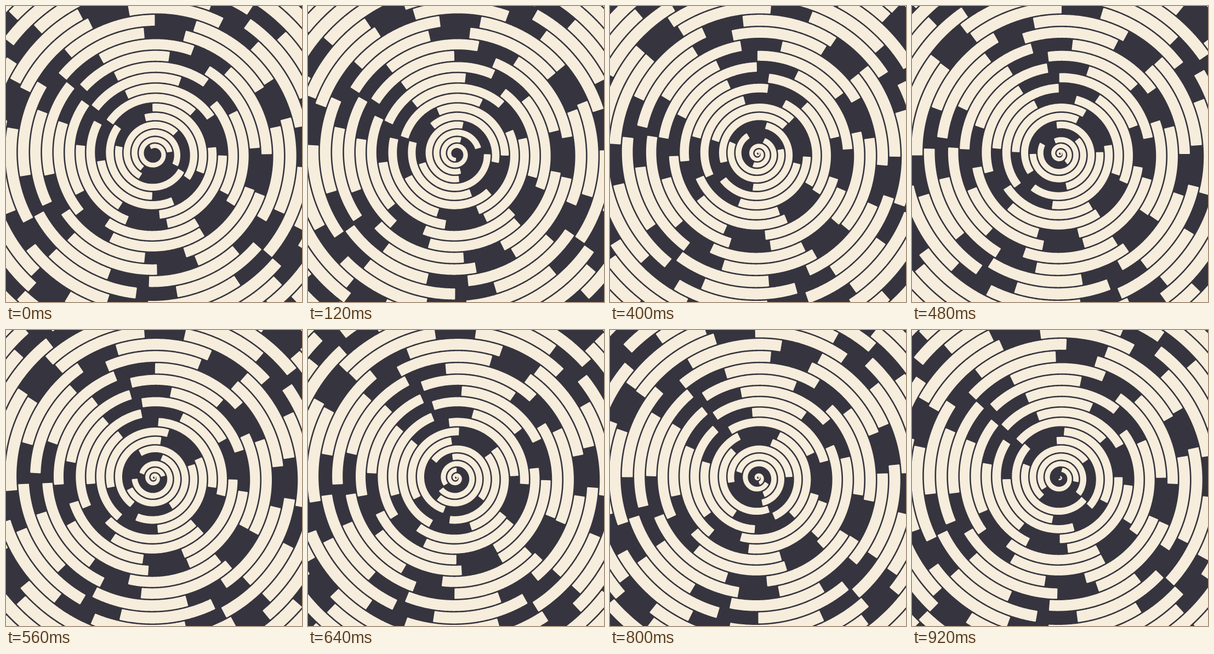
An HTML page with a canvas that plays this animation: 540 by 540 pixels, repeating every 0.96 s.

```html
<!DOCTYPE html>
<html>
<head>
<meta charset="utf-8">
<style>
  html, body { margin: 0; width: 100%; height: 100%; overflow: hidden; background: #36343e; }
  canvas { display: block; }
</style>
</head>
<body>
<canvas id="stage" width="540" height="540"></canvas>
<script>
const ctx = document.getElementById('stage').getContext('2d');
const LOOP = 960;
const DARK = '#36343e', LIGHT = '#f6eddc';
const SCALE = 5.906, POWER = 1.3767;   // radius = SCALE * turns ^ POWER
const START = 0.08;                    // turns clockwise from the top
const PERIOD = 247, DASH = PERIOD * 0.7;
const PHASE = 242.7;                   // outer end of the innermost dash
const CORNER = 1.2, INSET = 1.3 + CORNER;
const MAX_TURNS = 21.5, STEPS = 90;

const radius = turns => SCALE * Math.max(0, turns) ** POWER;

// Number of turns at a given arc length from the centre.
function turnsAt(length) {
  const area = 2 * Math.PI * SCALE / (POWER + 1);
  let turns = 0;
  for (let i = 0; i < 6; i++) {
    const rest = Math.max(0, length - 2.364 * turns ** (POWER - 1));
    turns = (rest / area) ** (1 / (POWER + 1));
  }
  return turns;
}

function addPoint(turns, r) {
  const angle = (turns + START) * 2 * Math.PI;
  ctx.lineTo(270 + r * Math.sin(angle), 270 - r * Math.cos(angle));
}

function drawDash(start, end) {
  // Pull the ends in to make room for the rounded corners.
  const from = turnsAt(start + CORNER), to = turnsAt(end - CORNER);
  const at = i => from + (to - from) * i / STEPS;
  const inner = m => radius(m - 0.5) + INSET;
  const outer = m => Math.max(inner(m), radius(m + 0.5) - INSET);
  ctx.beginPath();
  for (let i = 0; i <= STEPS; i++) addPoint(at(i), outer(at(i)));
  for (let i = STEPS; i >= 0; i--) addPoint(at(i), inner(at(i)));
  ctx.closePath();
  ctx.fill();
  ctx.stroke();
}

function draw(now) {
  const progress = now % LOOP / LOOP;
  ctx.fillStyle = DARK;
  ctx.fillRect(0, 0, 540, 540);
  ctx.fillStyle = ctx.strokeStyle = LIGHT;
  ctx.lineWidth = CORNER * 2;
  ctx.lineJoin = 'round';
  let end = PHASE - PERIOD * progress;
  for (; turnsAt(end - DASH) < MAX_TURNS; end += PERIOD) {
    if (end > 4) drawDash(Math.max(0, end - DASH), end);
  }
}

const begin = performance.now();
function tick() {
  draw(performance.now() - begin);
  requestAnimationFrame(tick);
}
tick();
</script>
</body>
</html>
```
